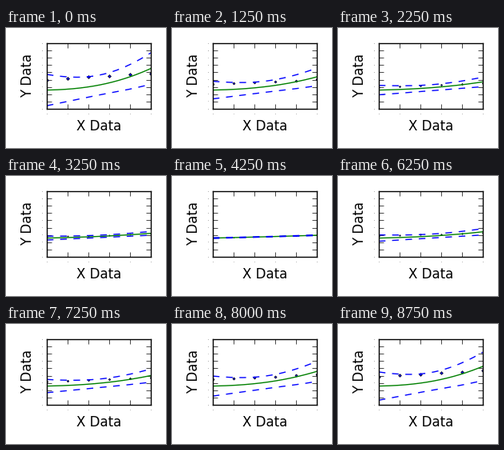
These frames come from a looping animation (200x150 px, 9000 ms). A matplotlib script:

```python
import numpy as np
import matplotlib.pyplot as plt
from matplotlib.animation import FuncAnimation

W, H, DPI = 200, 150, 100
LEFT, RIGHT, TOP, BOTTOM = 51, 181, 19, 101
FRAMES, INTERVAL = 36, 250

plt.rcParams["font.family"] = "DejaVu Sans"

fig = plt.figure(figsize=(W / DPI, H / DPI), dpi=DPI, facecolor="white")
ax = fig.add_axes([LEFT / W, 1 - BOTTOM / H, (RIGHT - LEFT) / W, (BOTTOM - TOP) / H])

# The vertical axis is measured in pixels from the top of the stage.
ax.set_xlim(0, 5)
ax.set_ylim(BOTTOM, TOP)
ax.set_xticks(range(6))
ax.set_yticks(np.linspace(BOTTOM, TOP, 10), labels=[str(n) for n in range(10)])
ax.tick_params(direction="in", top=True, right=True, length=4, width=0.5,
               pad=4, labelsize=1)
for spine in ax.spines.values():
    spine.set_linewidth(1)


def label(x, y, text, angle=0):
    fig.text(x / W, 1 - y / H, text, fontsize=12, rotation=angle,
             rotation_mode="anchor", ha="center", va="baseline")


label(116.5, 128, "X Data")
label(32, 59.5, "Y Data", 90)

u = np.linspace(0, 1, 201)
pts = np.linspace(0, 1, 6)

dots, = ax.plot([], [], "D", mfc="blue", mec="black", mew=0.5)
fit, = ax.plot([], [], color=(0, 0.5, 0), lw=1)
bands = [ax.plot([], [], color="blue", lw=1, ls=(0, (6, 6)))[0] for _ in range(2)]


def noise(i):
    step = min(i, FRAMES - i)
    return (1 - step / 20) ** 2


def update(i):
    s = noise(i)
    model = 77.6 - 3 * u - 24 * s * u ** 2.35
    half = s * np.sqrt(12.4 ** 2 + 15.1 ** 2 * (2 * u - 1) ** 2)
    fit.set_data(5 * u, model)
    for line, sign in zip(bands, (-1, 1)):
        line.set_data(5 * u, model + sign * half)
    dots.set_data(5 * pts, 77.6 - 13 * s - (3 + 5 * s) * pts)
    dots.set_markersize(2 * np.sqrt(s))
    return [dots, fit, *bands]


anim = FuncAnimation(fig, update, frames=FRAMES, interval=INTERVAL,
                     repeat=True, repeat_delay=0, blit=False)
plt.show()
```
